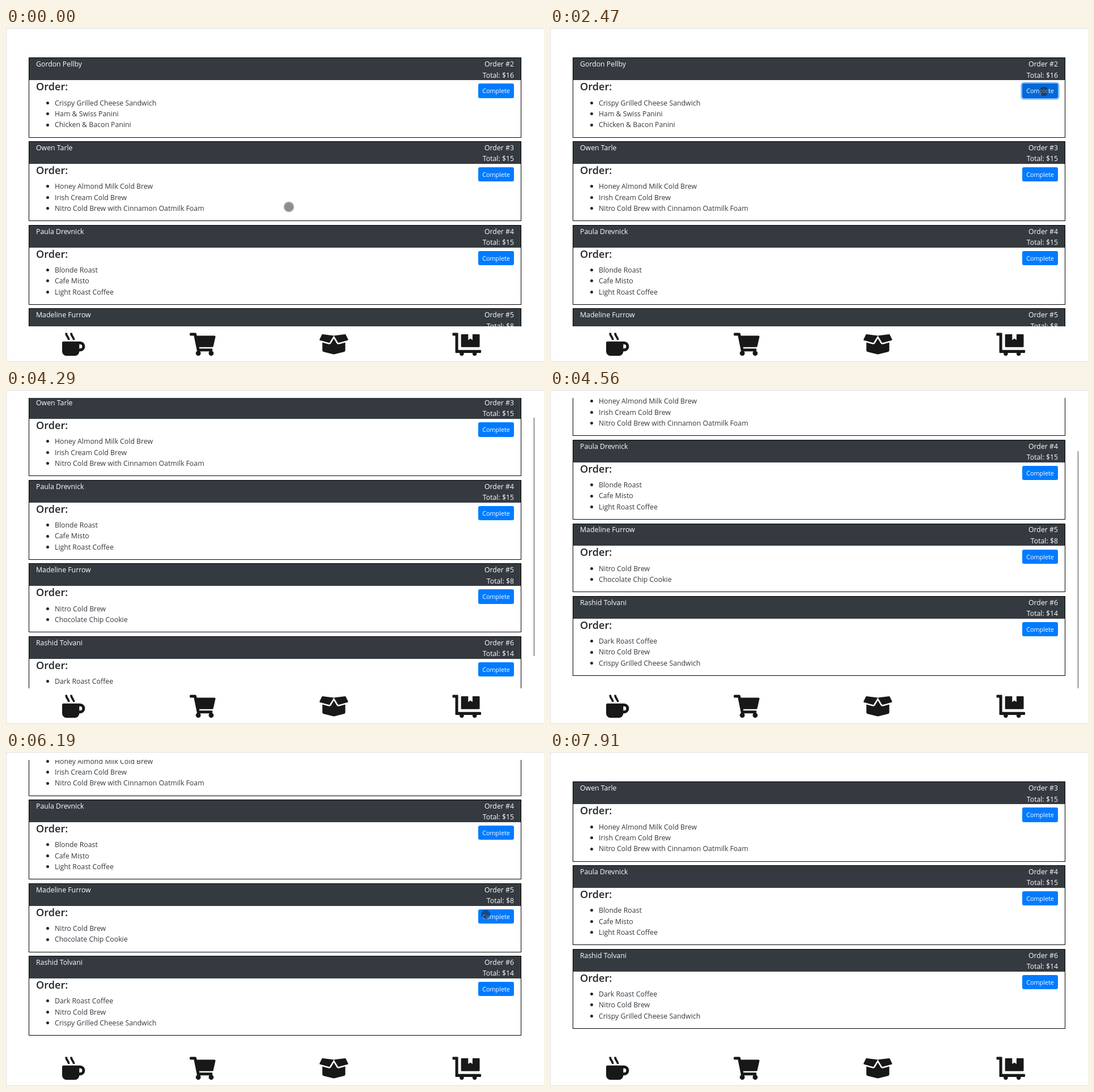
Write an HTML page that moves like this. It is 949x590 px and loops after 8 s.

```html
<!DOCTYPE html>
<html lang="en">
<head>
<meta charset="utf-8">
<title>Order queue</title>
<style>
html, body { margin: 0; height: 100%; overflow: hidden; background: #fff; }
body { position: relative; font: 12.3px/19.44px "Open Sans", sans-serif; color: #212529; }
#frame { position: absolute; inset: 0; border: solid #dedede; border-width: 1px 0 1px 1px; }
#view { position: absolute; left: 0; top: 14px; width: 100%; height: 513px; overflow: hidden; }
#list { position: absolute; left: 40px; width: 869px; }
.card { position: relative; box-sizing: border-box; margin-bottom: 6.5px; padding-bottom: 12.6px; border: 1px solid #000; }
header { display: flex; justify-content: space-between; height: 38.9px; padding: 0 12px; background: #343a40; color: #fff; font-weight: 500; text-align: right; }
header span, li span { position: relative; top: .9px; }
h4 { margin: 0; padding: 0 12px 6.1px; font-size: 18.1px; line-height: 23.3px; font-weight: 600; }
ul { margin: 0; padding: 0 0 0 45px; list-style: none; }
li { position: relative; color: #33383d; }
li::before { content: ""; position: absolute; left: -15px; top: 8px; width: 5px; height: 5px; border-radius: 50%; background: #212529; }
.btn { position: absolute; right: 12px; top: 45px; width: 63px; height: 25.4px; border-radius: 3px; background: #007bff; color: #fff; font-size: 10.8px; font-weight: 500; line-height: 26.4px; text-align: center; }
.btn.on { background: #0069d9; box-shadow: 0 0 0 2.6px rgba(0, 123, 255, .5); }
#bar { position: absolute; left: 930px; width: 3px; height: 421px; background: #b4b4b4; }
svg { position: absolute; left: 0; top: 0; fill: #181818; fill-rule: evenodd; }
#dot { position: absolute; width: 16px; height: 16px; margin: -8px; border-radius: 50%; background: rgba(28, 28, 28, .5); }
#dot.ring { box-shadow: 0 0 0 1.5px rgba(128, 128, 128, .5); }
</style>
</head>
<body>
<div id="frame"></div>
<div id="view"><div id="list"></div><div id="bar"></div></div>
<svg width="949" height="590">
  <g transform="translate(99 538.5) scale(.079)">
    <path id="steam" d="M88 2C94 90 144 80 152 158" fill="none" stroke="#181818" stroke-width="47"/>
    <use href="#steam" x="112"/>
    <path d="M32 192H400a112 112 0 0 1 0 224H384a96 96 0 0 1-96 96H96a96 96 0 0 1-96-96V224a32 32 0 0 1 32-32zM384 256v96h16a48 48 0 0 0 0-96z"/>
  </g>
  <path transform="translate(324 538.5) scale(.079)" d="M24 0H127a24 24 0 0 1 23 19L159 64H552a24 24 0 0 1 23 29L528 301a24 24 0 0 1-23 19H212l6 32H487a24 24 0 0 1 23 29l-6 25a56 56 0 1 1-63 10H231a56 56 0 1 1-67-9L94 64H24A24 24 0 0 1 0 40V24A24 24 0 0 1 24 0z"/>
  <g transform="translate(553 538.5) scale(.079)">
    <path d="M320 126L256 233Q238 262 201 254L64 215V393Q66 418 88 424L304 478Q320 482 336 478L552 424Q574 418 576 393V215L439 254Q402 262 384 233z"/>
    <path id="flap" d="M320 64L70 32Q58 32 53 41L2 144Q-4 161 12 167L210 223Q221 225 228 216z"/>
    <use href="#flap" transform="matrix(-1 0 0 1 640 0)"/>
  </g>
  <g transform="translate(787.5 538.5) scale(.079)">
    <path d="M208 32H352V160l48-32 48 32V32H592a16 16 0 0 1 16 16V304a16 16 0 0 1-16 16H208a16 16 0 0 1-16-16V48a16 16 0 0 1 16-16z"/>
    <path d="M16 0H112a16 16 0 0 1 16 16V384H624a16 16 0 0 1 16 16v32a16 16 0 0 1-16 16H541a48 48 0 1 1-90 0H253a48 48 0 1 1-90 0H80a16 16 0 0 1-16-16V64H16A16 16 0 0 1 0 48V16A16 16 0 0 1 16 0z"/>
  </g>
</svg>
<div id="dot"></div>
<script>
const LOOP = 8000, STEP = 124;
const SCROLL_START = 4290, SCROLL_MAX = 116;
const $ = id => document.getElementById(id);

const orders = [
  { name: "Gordon Pellby", total: 16, press: 2470, done: 2960, items: ["Crispy Grilled Cheese Sandwich", "Ham &amp; Swiss Panini", "Chicken &amp; Bacon Panini"] },
  { name: "Owen Tarle", total: 15, items: ["Honey Almond Milk Cold Brew", "Irish Cream Cold Brew", "Nitro Cold Brew with Cinnamon Oatmilk Foam"] },
  { name: "Paula Drevnick", total: 15, items: ["Blonde Roast", "Cafe Misto", "Light Roast Coffee"] },
  { name: "Madeline Furrow", total: 8, press: 6830, done: 7100, items: ["Nitro Cold Brew", "Chocolate Chip Cookie"] },
  { name: "Rashid Tolvani", total: 14, items: ["Dark Roast Coffee", "Nitro Cold Brew", "Crispy Grilled Cheese Sandwich"] }
];

$("list").innerHTML = orders.map(({ name, total, items }, i) => `
  <div class="card">
    <header><span>${name}</span><span>Order #${i + 2}<br>Total: $${total}</span></header>
    <h4>Order:</h4>
    <ul>${items.map(item => `<li><span>${item}</span></li>`).join("")}</ul>
    <div class="btn">Complete</div>
  </div>`).join("");
const cards = [...document.querySelectorAll(".card")];

// each touch glides from one point to another in some steps, then rests; down = pressed interval
const touches = [
  { start: 0, end: 1140, from: [499, 316], to: [505.5, 292.5], steps: 6 },
  { start: 1290, end: 3340, from: [700, 222], to: [871, 112], steps: 3, down: [2470, 2590] },
  { start: 3630, end: 3770, from: [636.5, 291.5] },
  { start: 4020, end: 4140, from: [519.5, 384.5] },
  { start: 5320, end: 7910, from: [532, 263], to: [846, 287], steps: 7, down: [6180, 6950] }
];

const stepsSince = (start, t) => Math.floor((t - start) / STEP);
const within = (t, start, end) => t >= start && t < end;

function drawOrders(t) {
  cards.forEach((card, i) => {
    const { press, done } = orders[i];
    card.style.display = t >= done ? "none" : "";
    card.lastElementChild.classList.toggle("on", t >= press);
  });
}

function drawScroll(t) {
  const scrolled = within(t, SCROLL_START, 7100);
  const lag = Math.exp(-.44 - stepsSince(SCROLL_START, t) * STEP / 83);
  const offset = scrolled ? SCROLL_MAX * (1 - lag) : 0;
  $("list").style.top = 38.4 - offset + "px";
  $("bar").style.top = offset * .84 + "px";
  $("bar").style.opacity = !scrolled || t >= 5320 ? 0 : t < 5170 ? 1 : .5;
}

function drawTouch(t) {
  const touch = touches.find(({ start, end }) => within(t, start, end));
  const dot = $("dot");
  dot.style.display = touch ? "" : "none";
  if (!touch) return;
  const { start, from, to = from, steps = 1, down = [0, 0] } = touch;
  const left = 1 - Math.min(1, stepsSince(start, t) / steps);
  const [x, y] = to.map((end, i) => end + (from[i] - end) * left * left);
  dot.style.left = x + "px";
  dot.style.top = y + "px";
  dot.classList.toggle("ring", !within(t, ...down));
}

function draw(t) {
  drawOrders(t);
  drawScroll(t);
  drawTouch(t);
}

const begin = performance.now();
function tick(now) {
  draw(Math.max(0, now - begin) % LOOP);
  requestAnimationFrame(tick);
}
draw(0);
requestAnimationFrame(tick);
</script>
</body>
</html>
```
